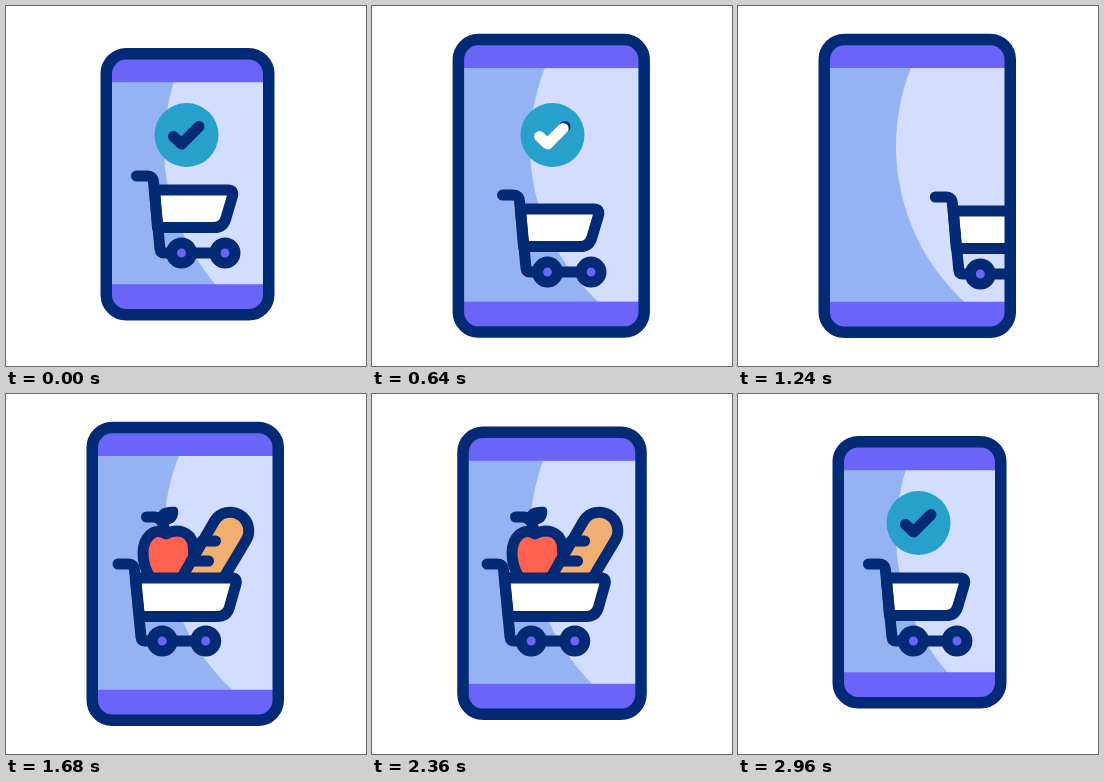
Recreate the animation shown at these times as an HTML page. Size 360 by 360 pixels, loop 3000 ms.

```html
<!DOCTYPE html>
<html lang="en">
<head>
<meta charset="utf-8">
<title>Mobile shopping</title>
<style>
  html, body { margin: 0; height: 100%; overflow: hidden; background: #fff; }
  svg { display: block; width: 100vw; height: 100vh; }
  .line { fill: none; stroke: #022a75; stroke-width: 11; stroke-linecap: round; stroke-linejoin: round; }
  .white { fill: #fff; }
  .purple { fill: #6b64f8; }
  .apple { fill: #ff6250; }
  .bread { fill: #f0ae70; }
  .leaf { fill: #022a75; }
  #frame { stroke-width: 11.5; }
  #tick { stroke: #fff; }
</style>
</head>
<body>
<svg viewBox="0 0 360 360">
  <defs>
    <clipPath id="screen"><rect id="mask" rx="20"/></clipPath>
    <g id="wheels" class="line purple">
      <circle cx="175.5" cy="247" r="10"/>
      <circle cx="219" cy="247" r="10"/>
      <path d="M186 247H209"/>
    </g>
  </defs>
  <g clip-path="url(#screen)">
    <rect width="360" height="360" fill="#95b3f3"/>
    <circle cx="370" cy="140" r="212" fill="#d3ddff"/>
    <rect id="top" class="purple" width="360" height="60"/>
    <rect id="bottom" class="purple" width="360" height="60"/>

    <g id="badge">
      <circle cx="180.5" cy="129" r="32" fill="#28a0cc"/>
      <path class="line" d="M167.5 130.5L175.5 138L193 120.5"/>
      <path class="line" id="tick" pathLength="1" d="M167.5 130.5L175.5 138L193 120.5"/>
    </g>

    <g id="empty">
      <path class="line white" d="M148.500 184H222Q228 184 226.500 190L220 212Q217.500 221.500 208 221.500H151.500Z"/>
      <path class="line" d="M130.500 170H141Q147 170 147.500 176L154 243Q154.500 247 158 247H165"/>
      <use href="#wheels"/>
    </g>

    <g id="full">
      <path class="line apple" d="M160 140C148 132 137 144 137 159C137 172 143 186 153 191H178C187 180 189 165 187 150C184 137 171 134 160 140Z"/>
      <path class="line" d="M140.500 123H148Q158 124 158.500 137"/>
      <path class="leaf" d="M152 127C149 117 156 112 170 113C174 115 172 124 169 127C165 131 157 132 152 127Z"/>
      <path class="line bread" d="M172 190L208.500 127A18.500 18.500 0 0 1 240 146.500L214 190Z"/>
      <path class="line" d="M196 147H209.500M185 167H202.500"/>
      <path class="line white" d="M129.500 184H226Q231.500 184 230 190L223.500 213Q221 222.500 211 222.500H133.500Z"/>
      <path class="line" d="M112 170H122Q128 170 128.500 176L135 243Q135.500 247 139 247H146"/>
      <use href="#wheels" x="-19.300"/>
    </g>
  </g>
  <rect id="frame" class="line" rx="20"/>
</svg>
<script>
const LOOP = 3000, SLIDE = 225, BADGE_SLIDE = 145;
const $ = id => document.getElementById(id);
const lerp = (a, b, k) => a + (b - a) * k;

function ease(t, start, duration) {
  const k = Math.min(1, Math.max(0, (t - start) / duration));
  return k < .5 ? 4 * k ** 3 : 1 - 4 * (1 - k) ** 3;
}

function set(id, attributes) {
  for (const name in attributes) $(id).setAttribute(name, attributes[name]);
}

const move = (id, x, y = 0) => set(id, { transform: `translate(${x} ${y})` });

function drawPhone(grow) {
  const x = lerp(100.25, 86.25, grow), right = lerp(262.75, 272.25, grow);
  const y = lerp(47.75, 33.5, grow), bottom = lerp(308.75, 326.25, grow);
  const box = { x, y, width: right - x, height: bottom - y };
  set('frame', box);
  set('mask', box);
  set('top', { y: y + 28.5 - 60 });
  set('bottom', { y: bottom - 30.5 });
}

function draw(t) {
  drawPhone(ease(t, 80, 640) - ease(t, 2080, 640));

  const returning = t > 1900;
  const tick = returning ? 0 : ease(t, 200, 600);
  set('tick', { 'stroke-dasharray': `${tick} 2`, visibility: tick > .002 ? 'visible' : 'hidden' });
  move('badge', BADGE_SLIDE * (returning ? ease(t, 2160, 740) - 1 : ease(t, 765, 740)));

  const swap = ease(t, 930, 740), back = ease(t, 2250, 740);
  move('empty', SLIDE * (returning ? back - 1 : swap), returning ? 0 : 21 * ease(t, 200, 615));
  move('full', SLIDE * (swap - 1 + back));
}

function tickClock(now) {
  draw(now % LOOP);
  requestAnimationFrame(tickClock);
}
draw(0);
requestAnimationFrame(tickClock);
</script>
</body>
</html>
```
